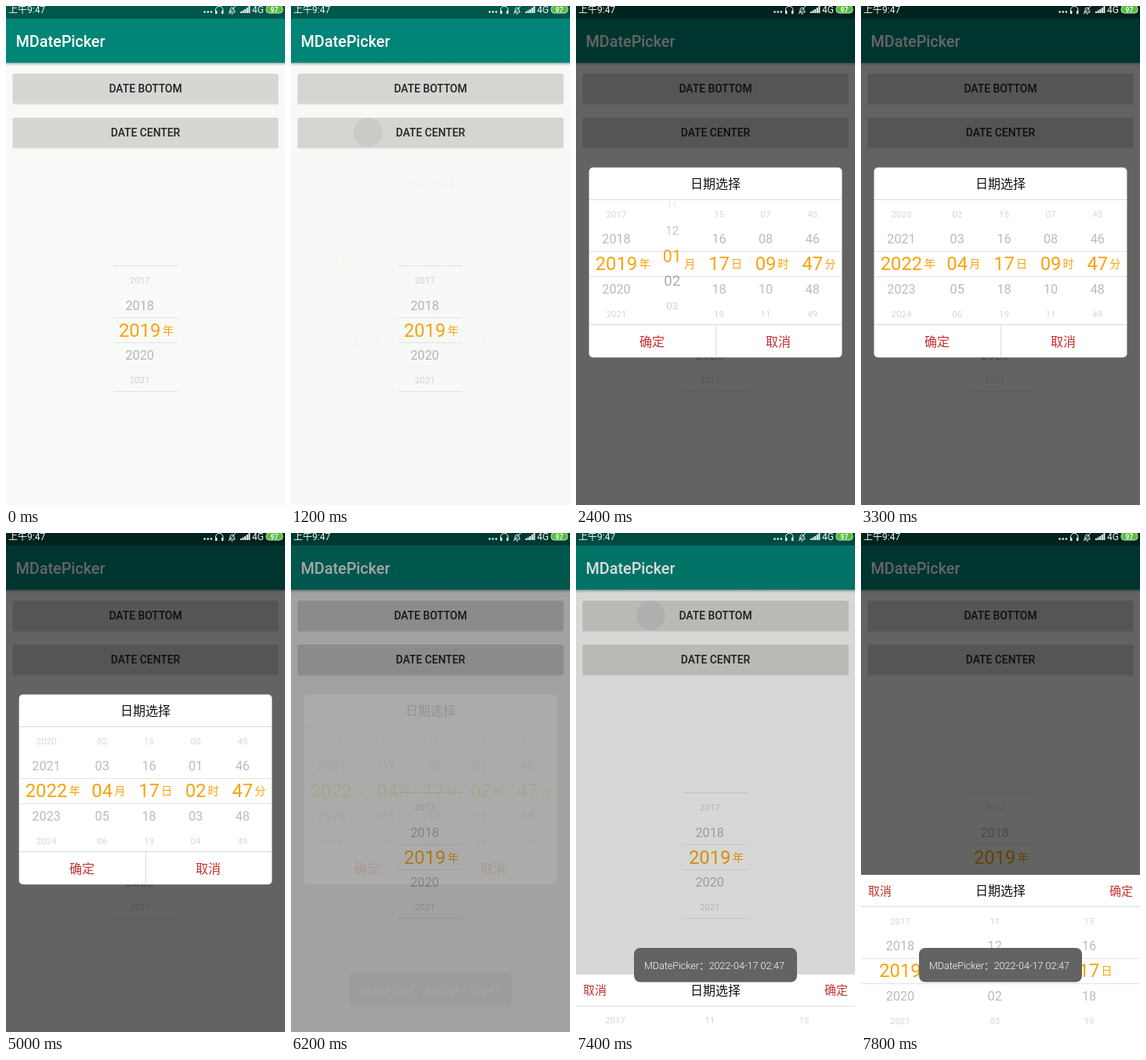
These frames come from a looping animation (356x635 px, 8000 ms). An HTML page:

```html
<!DOCTYPE html>
<html lang="zh-CN">
<head>
<meta charset="utf-8">
<title>Date picker</title>
<style>
html, body { margin: 0; width: 100%; height: 100%; overflow: hidden; background: #f8faf7; }
svg { display: block; width: 356px; height: 635px; font-family: Roboto, "Noto Sans CJK SC", "Noto Sans CJK", sans-serif; }
.mid { text-anchor: middle; }
.red { fill: #c4302f; }
.line { stroke: #e2e3e2; }
.edge { stroke: #dadada; }
</style>
</head>
<body>
<svg id="stage" viewBox="0 0 356 635">
  <defs>
    <linearGradient id="barShadow" x2="0" y2="1">
      <stop stop-opacity=".24"/><stop offset="1" stop-opacity="0"/>
    </linearGradient>
    <clipPath id="bottomClip"><rect x="9" y="86" width="338" height="38" rx="2"/></clipPath>
    <clipPath id="centerClip"><rect x="9" y="142" width="338" height="38" rx="2"/></clipPath>
  </defs>

  <rect width="356" height="635" fill="#f8faf7"/>
  <rect width="356" height="72.4" fill="#008577"/>
  <rect width="356" height="16" fill="#00574b"/>
  <rect y="72.4" width="356" height="4" fill="url(#barShadow)"/>
  <text x="12.5" y="52" font-size="19.8" font-weight="500" fill="#fff">MDatePicker</text>
  <g id="buttons" class="mid" font-size="13.85" font-weight="500" fill="#222"></g>
  <circle id="bottomRipple" cx="95" cy="105" clip-path="url(#bottomClip)"/>
  <circle id="centerRipple" cx="98" cy="161" clip-path="url(#centerClip)"/>
  <g id="inline">
    <path class="line" d="M137 330.5h82M137 396.5h82M137 428.5h82M137 490.5h82"/>
  </g>

  <rect id="dim" width="356" height="635"/>

  <g id="dialog">
    <rect x="16.6" y="205.5" width="322.8" height="241.7" rx="5" fill="#fff"/>
    <path class="line" d="M17 312.5h322M17 344.5h322"/>
    <path class="edge" d="M17 246.5h322M17 405.5h322M178.5 406v41"/>
    <g class="mid" font-size="16">
      <text x="178" y="232" fill="#111">日期选择</text>
      <text x="97" y="433" class="red">确定</text>
      <text x="258" y="433" class="red">取消</text>
    </g>
  </g>

  <g id="sheet">
    <rect y="435" width="356" height="200" fill="#fff"/>
    <path class="line" d="M0 541.5h356M0 573.5h356"/>
    <path class="edge" d="M0 475.5h356"/>
    <g class="mid" font-size="16">
      <text x="178" y="461" fill="#111">日期选择</text>
      <text x="24" y="460.5" font-size="15" class="red">取消</text>
      <text x="332" y="460.5" font-size="15" class="red">确定</text>
    </g>
  </g>

  <g id="toast">
    <rect x="74" y="528" width="208" height="43.5" rx="8" fill="#626362"/>
    <text x="87" y="555" font-size="12.55" font-weight="300" fill="#fff">MDatePicker：2022-04-17 02:47</text>
  </g>

  <g fill="#f2f6f5" font-size="12">
    <text x="3" y="9">上午9:47</text>
    <text x="314" y="9">4G</text>
    <circle cx="253.5" cy="7.5" r="1.3"/><circle cx="257.7" cy="7.5" r="1.3"/><circle cx="261.9" cy="7.5" r="1.3"/>
    <path d="M267.5 7V5a4.7 4.7 0 0 1 9.4 0v2M285 8l1-2V4a2.6 2.6 0 0 1 5 0v2l1.2 2zM287.3 10h2.4M293 0l-9 10" fill="none" stroke="#f2f6f5"/>
    <path d="M267 6h2.4v4H267zM275 6h2.4v4H275z"/>
    <path d="M299 7h2v2h-2zM301.6 5.5h2v3.5h-2zM304.2 4h2v5h-2zM306.8 2h2v7h-2zM309.4 0h2v9h-2z"/>
    <rect x="332" y="-.5" width="21" height="9.5" rx="4" fill="#58bd3f" stroke="#c8e8c2"/>
    <text x="342.5" y="7.5" font-size="8.5" font-weight="700" class="mid">97</text>
  </g>
</svg>

<script>
const LOOP = 8000, ROW = 31.75;
const byId = id => document.getElementById(id);

function add(parent, tag, attrs, text = '') {
  const node = document.createElementNS('http://www.w3.org/2000/svg', tag);
  for (const key in attrs) node.setAttribute(key, attrs[key]);
  node.textContent = text;
  parent.append(node);
  return node;
}

const clamp = v => Math.max(0, Math.min(1, v));
const progress = (t, from, to) => clamp((t - from) / (to - from));
const smooth = p => p * p * (3 - 2 * p);
const easeOut = p => 1 - (1 - p) ** 2;

// Linear interpolation through [position, value] pairs.
function track(t, ...points) {
  let [x0, v0] = points[0];
  for (const [x, v] of points) {
    if (t < x) return t <= x0 ? v0 : v0 + (v - v0) * (t - x0) / (x - x0);
    [x0, v0] = [x, v];
  }
  return v0;
}

for (const [label, y] of [['DATE BOTTOM', 86], ['DATE CENTER', 142]]) {
  const box = { x: 9, width: 338, height: 38, rx: 2 };
  add(byId('buttons'), 'rect', { ...box, x: 8, width: 340, y: y + .5, height: 39, 'fill-opacity': .12 });
  add(byId('buttons'), 'rect', { ...box, y, fill: '#d5d7d3' });
  add(byId('buttons'), 'text', { x: 178, y: y + 24.3 }, label);
}

const pad = n => String(n).padStart(2, '0');
const wrap = (n, size) => ((n % size) + size) % size;
const units = {
  年: String,
  月: n => pad(wrap(n - 1, 12) + 1),
  日: n => pad(wrap(n - 1, 31) + 1),
  时: n => pad(wrap(n, 24)),
  分: n => pad(wrap(n, 60))
};

let wheelCount = 0;
function wheel(parentId, x, y, unit) {
  const clipId = 'wheel' + wheelCount++;
  const parent = byId(parentId);
  const clip = add(parent, 'clipPath', { id: clipId });
  add(clip, 'rect', { x: x - 45, y: y - 81, width: 90, height: 158 });
  const group = add(parent, 'g', { class: 'mid', 'clip-path': `url(#${clipId})` });
  const items = Array.from({ length: 7 }, () => add(group, 'text', { x }));
  add(parent, 'text', {
    x: x + (unit === '年' ? 36 : 22.5), y: y + 5, class: 'mid', 'font-size': 14, fill: '#f9a30b'
  }, unit);

  return value => {
    const nearest = Math.round(value);
    items.forEach((item, i) => {
      const n = nearest + i - 3;
      const offset = n - value, depth = Math.abs(offset);
      const size = track(depth, [0, 23.8], [1, 16.2], [2, 11.6], [3, 8]);
      const selected = n === nearest;
      item.textContent = units[unit](n);
      item.setAttribute('font-size', size);
      item.setAttribute('y', y + offset * ROW + size * .355);
      item.setAttribute('fill', selected ? '#f9a30b' : '#000');
      item.setAttribute('fill-opacity', selected ? 1 : track(depth, [.5, .36], [1, .27], [2, .16], [3, .04]));
    });
  };
}

wheel('inline', 170.7, 412.5, '年')(2019);
wheel('sheet', 50, 557, '年')(2019);
wheel('sheet', 170.7, 557, '月')(1);
wheel('sheet', 291, 557, '日')(17);
wheel('dialog', 182.5, 328, '日')(17);
wheel('dialog', 301.8, 328, '分')(47);
const setYear = wheel('dialog', 51.5, 328, '年');
const setMonth = wheel('dialog', 122.7, 328, '月');
const setHour = wheel('dialog', 242, 328, '时');

const spin = (t, from, to) => smooth(progress(t, from, to));
const setOpacity = (id, value) => byId(id).setAttribute('opacity', value);
const shiftDown = (id, dy) => byId(id).setAttribute('transform', `translate(0 ${dy})`);

function ripple(id, t, start) {
  byId(id).setAttribute('r', 105 * easeOut(progress(t, start, start + 550)));
  setOpacity(id, track(t, [start, 0], [start + 50, .05], [start + 300, .05], [start + 450, 0]));
}

function render(t) {
  setMonth(1 + 3 * spin(t, 2300, 2800));
  setYear(2019 + 3 * spin(t, 2900, 3300));
  setHour(9 - 4 * spin(t, 3700, 4200) - 3 * spin(t, 4600, 5000));

  setOpacity('dim', track(t,
    [1200, 0], [1400, .45], [1500, .55], [1600, .6],
    [6100, .6], [6200, .35], [6400, 0],
    [7350, 0], [7500, .4], [7600, .6]));
  setOpacity('dialog', track(t, [1200, 0], [1370, 1], [6100, 1], [6200, .1], [6250, 0]));

  setOpacity('toast', track(t, [6150, 0], [6200, .08], [6550, 1]));
  shiftDown('toast', 40 * (1 - easeOut(progress(t, 6150, 6600))));
  shiftDown('sheet', 200 * (1 - easeOut(progress(t, 7350, 7600))));
  ripple('centerRipple', t, 1150);
  ripple('bottomRipple', t, 7350);
}

const start = performance.now();
function tick() {
  render((performance.now() - start) % LOOP);
  requestAnimationFrame(tick);
}
tick();
</script>
</body>
</html>
```
